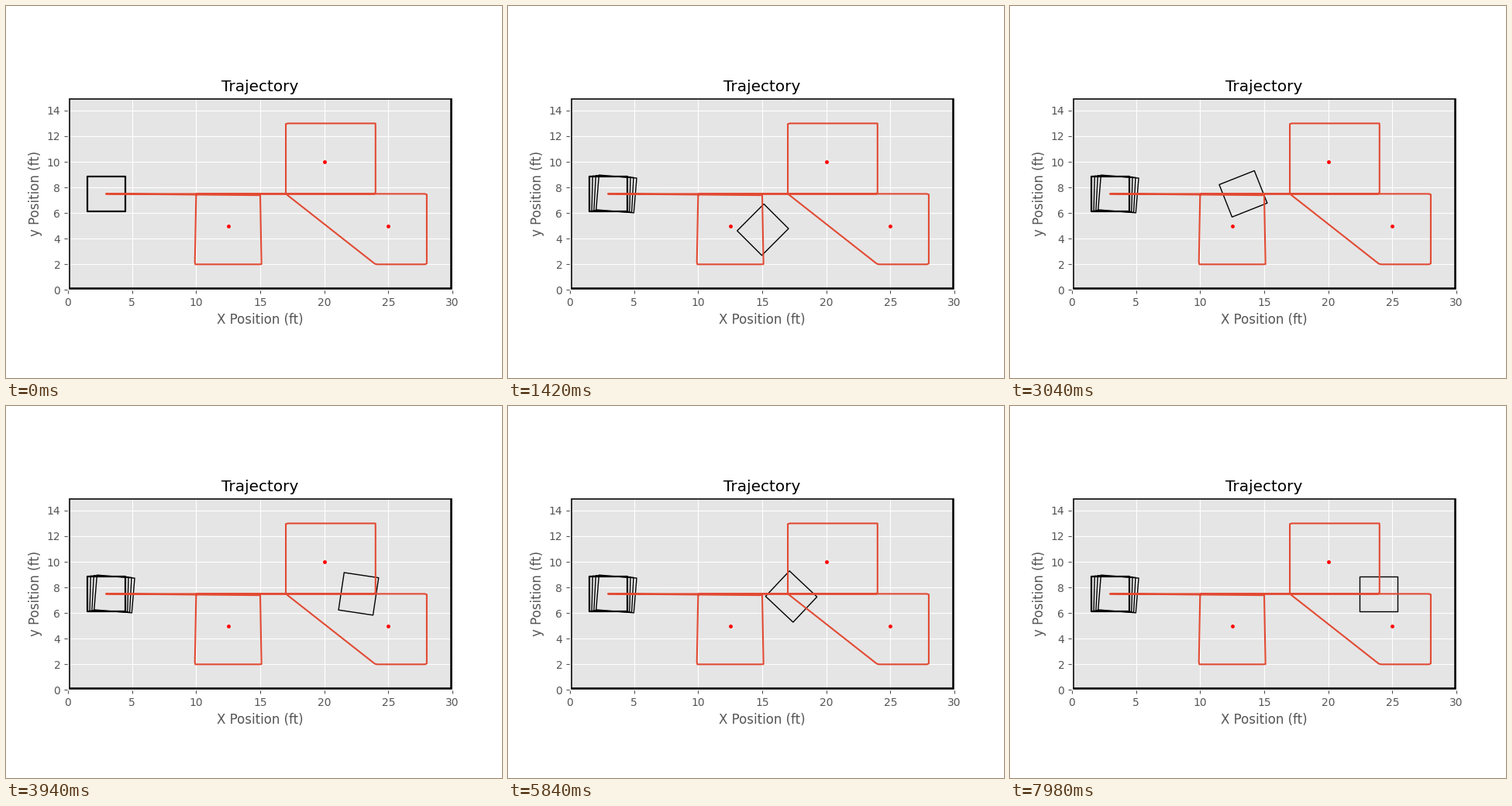
Write a matplotlib script that moves like this. It is 640x480 px and loops after 8 s.

```python
import numpy as np
import matplotlib.pyplot as plt
from matplotlib.animation import FuncAnimation
from matplotlib.patches import Polygon, Rectangle

plt.style.use("ggplot")

FRAMES, INTERVAL = 400, 20
STEP = 0.207            # feet travelled per frame
LENGTH, WIDTH = 2.95, 2.72
TRAILS = 4              # first poses stay on the field

MID = 7.5               # centre line of the field
START = (3, MID)
LOOPS = [
    [(15, MID - 0.1), (15.1, 2), (9.9, 2), (10, MID)],
    [(24, MID), (24, 13), (17, 13), (17, MID)],
    [(24, 2), (28, 2), (28, MID)],
]
MARKERS = [(12.5, 5), (20, 10), (25, 5)]

# The robot turns evenly along each leg, a quarter turn on most of them.
points = np.array([START, *sum(LOOPS, []), START])
turns = np.array([-90] * 4 + [90] * 3 + [45] * 2 + [90] * 2 + [0])
headings = np.radians(np.append(0, np.cumsum(turns)))
legs = np.hypot(*np.diff(points, axis=0).T)
dist = np.append(0, np.cumsum(legs))


def position(s):
    return [np.interp(s, dist, axis) for axis in points.T]


def outline(frame):
    s = frame * STEP
    a = np.interp(s, dist, headings)
    u = np.array([np.cos(a), np.sin(a)]) * LENGTH / 2
    v = np.array([-np.sin(a), np.cos(a)]) * WIDTH / 2
    return np.array(position(s)) + np.array([-u - v, u - v, u + v, -u + v])


def add_robot(frame, lw=1.0):
    box = Polygon(outline(frame), closed=True, fill=False, ec="black", lw=lw,
                  joinstyle="round")
    return ax.add_patch(box)


fig, ax = plt.subplots(figsize=(6.4, 4.8), dpi=100)
ax.set_aspect("equal")
ax.set_xlim(0, 30)
ax.set_ylim(0, 15)
ax.set_xticks(range(0, 31, 5))
ax.set_yticks(range(0, 15, 2))
ax.set_title("Trajectory")
ax.set_xlabel("X Position (ft)")
ax.set_ylabel("y Position (ft)")

ax.add_patch(Rectangle((0, 0), 30, 15, fill=False, ec="black", lw=4))
ax.plot(*position(np.append(np.arange(0, dist[-1], STEP), dist[-1])), lw=1.5)
ax.plot(*zip(*MARKERS), "r.", markersize=5)

trail = [add_robot(i, 1.6 if i == 0 else 1.0) for i in range(TRAILS)]
robot = add_robot(0)


def update(frame):
    for i, box in enumerate(trail):
        box.set_visible(i <= frame)
    robot.set_xy(outline(frame))
    robot.set_visible(frame >= TRAILS)
    return [*trail, robot]


anim = FuncAnimation(fig, update, frames=FRAMES, interval=INTERVAL,
                     init_func=lambda: update(0), repeat=True, repeat_delay=0)
plt.show()
```
